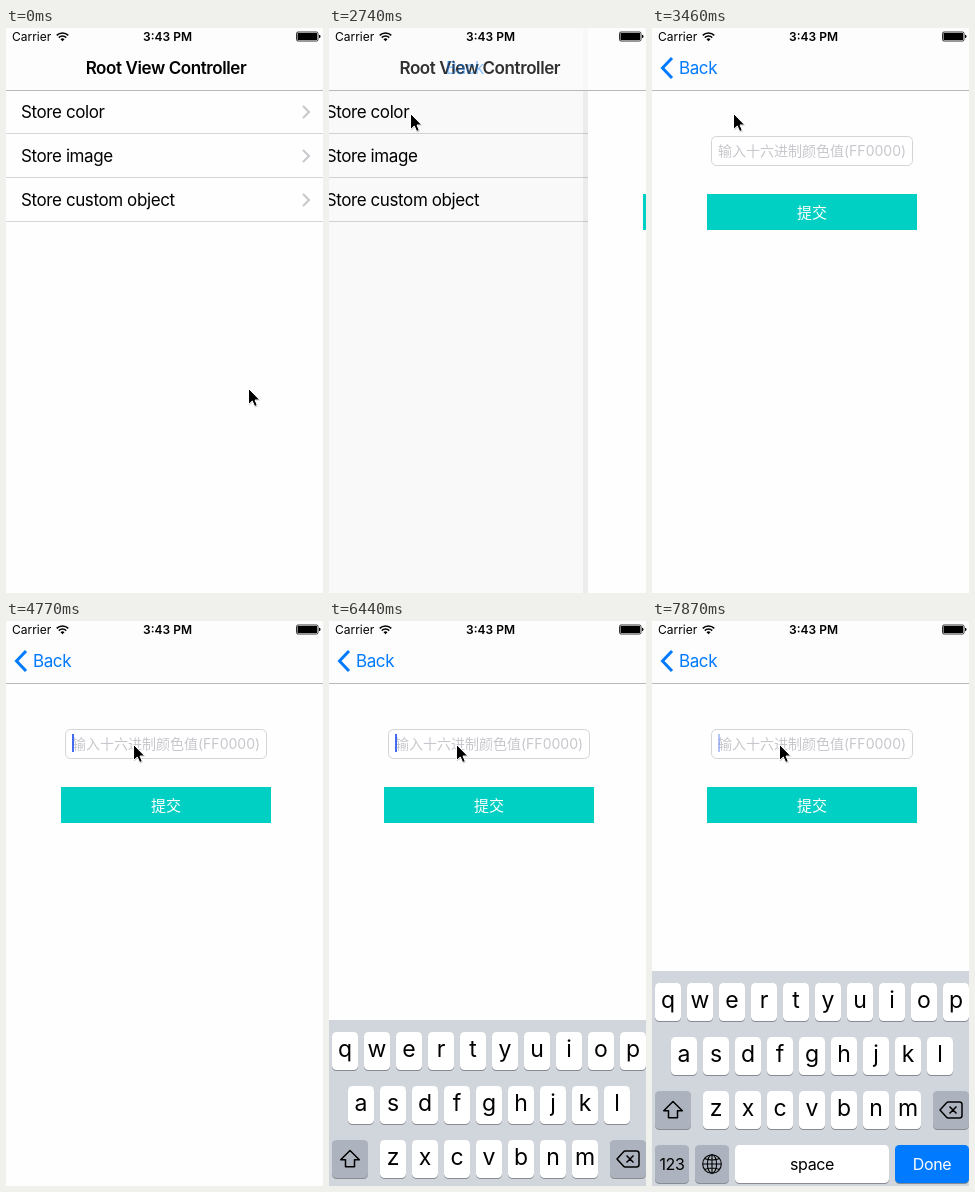
Recreate the animation shown at these times as an HTML page. Size 317 by 565 pixels, loop 7990 ms.

```html
<!DOCTYPE html>
<html lang="zh-CN">
<head>
<meta charset="utf-8">
<title>Navigation and keyboard</title>
<style>
  html, body { margin: 0; width: 100%; height: 100%; overflow: hidden; background: #fefefe; }
  svg { display: block; width: 100%; height: 100%; }
  text { font: 17px Inter, "Noto Sans CJK SC", "Noto Sans CJK", sans-serif; letter-spacing: -.4px; }
  .mid { text-anchor: middle; }
  .bold { font-weight: 600; }
  .status { font-size: 12px; letter-spacing: 0; }
  .letter { font-size: 23px; letter-spacing: 0; }
  .label { font-size: 16px; }
  .line { fill: none; stroke: #000; stroke-width: 1.5; }
</style>
</head>
<body>
<svg viewBox="0 0 317 565">
  <rect width="317" height="565" fill="#fefefe"/>
  <g id="list"></g>
  <rect id="dim" width="317" height="565"/>

  <g id="page">
    <rect x="-5" width="5" height="565" opacity=".05"/>
    <rect width="330" height="565" fill="#fefefe"/>
    <rect x="59.5" y="108.5" width="201" height="29" rx="5" fill="#fff" stroke="#d4d4d4"/>
    <text x="66" y="128" fill="#c7c7cd" style="font-size:14px;letter-spacing:0">输入十六进制颜色值(FF0000)</text>
    <rect id="caret" x="66" y="113" width="2" height="18" fill="#426bf2"/>
    <rect x="55" y="166" width="210" height="36" fill="#00cfc3"/>
    <text class="mid" x="160" y="190" fill="#fff" style="font-size:15px;letter-spacing:0">提交</text>
  </g>

  <rect width="317" height="62" fill="#fdfdfd" opacity=".75"/>
  <rect y="62" width="317" height="1" fill="#b9b9b9"/>
  <text id="title" class="mid bold" x="160" y="46">Root View Controller</text>
  <path id="chevron" d="M20 30 10.5 40 20 50" fill="none" stroke="#007aff" stroke-width="3"/>
  <text id="back" x="27" y="46" fill="#007aff">Back</text>

  <text class="status" x="6" y="13">Carrier</text>
  <path d="M50.7 7.4a8.3 8.3 0 0 1 11.6 0M52.8 9.6a5.3 5.3 0 0 1 7.4 0" class="line"/>
  <path d="M56.5 13.2l-2-2a2.8 2.8 0 0 1 4 0z"/>
  <text class="status bold mid" x="161.5" y="13">3:43 PM</text>
  <rect x="290.5" y="4" width="21.5" height="9" rx="1.5" fill="none" stroke="#000" stroke-width=".8"/>
  <path d="M291.5 5h19.5v7h-19.5zM313 6.8q1.6.3 1.6 1.7t-1.6 1.7z"/>

  <g id="keyboard"></g>
  <g id="pointer">
    <path d="M1 2V17.5L4.7 14.2 7 19.5 9.8 18.4 7.6 13H12.5Z" opacity=".22"/>
    <path d="M.5 .5V16.5L4.3 13 6.7 18.5 9.3 17.4 7 12H11.8Z" stroke="#fff"/>
  </g>
</svg>
<script>
const LOOP = 7990, TICK = 119.25, WIDTH = 320;
const $ = id => document.getElementById(id);
const move = (id, x, y = 0) => $(id).setAttribute('transform', `translate(${x} ${y})`);
const fade = (id, opacity) => $(id).setAttribute('opacity', opacity);

$('list').innerHTML = ['Store color', 'Store image', 'Store custom object'].map((name, i) => {
  const y = 62 + 44 * i;
  return `<text x="15" y="${y + 28}">${name}</text>
    <path d="M297 ${y + 16}l6 6-6 6" fill="none" stroke="#c7c7cc" stroke-width="2"/>
    <rect y="${y + 43}" width="330" height="1" fill="#d5d5d8"/>`;
}).join('');

// Key positions are relative to the top of the keyboard.
const rowTop = row => 12 + 54 * row;
const key = (row, x, width, fill, label = '', style = 'label', color = '#000') => {
  const y = rowTop(row);
  return `<rect x="${x}" y="${y + 1}" width="${width}" height="38" rx="4.5" fill="#888b91"/>
    <rect x="${x}" y="${y}" width="${width}" height="38" rx="4.5" fill="${fill}"/>
    <text class="mid ${style}" x="${x + width / 2}" y="${y + 25}" fill="${color}">${label}</text>`;
};
const letters = (row, x, chars) =>
  [...chars].map((c, i) => key(row, x + 32 * i, 26, '#fff', c, 'letter')).join('');
const GREY = '#adb3be';

$('keyboard').innerHTML = '<rect width="317" height="230" fill="#d1d5dc"/>' +
  letters(0, 3, 'qwertyuiop') + letters(1, 19, 'asdfghjkl') + letters(2, 51, 'zxcvbnm') +
  key(2, 3, 36, GREY) + key(2, 281, 36, GREY) +
  key(3, 3, 34, GREY, '123') + key(3, 43, 34, GREY) +
  key(3, 83, 154, '#fff', 'space') + key(3, 243, 74, '#007aff', 'Done', 'label', '#fff') +
  `<g class="line" stroke-linejoin="round">
    <path d="M21 130.5l9.3 9.3h-4.8v7h-9v-7h-4.8z"/>
    <path d="M288 139l6.6-7.3q.6-.7 1.6-.7h11.3q2.5 0 2.5 2.5v11q0 2.5-2.5 2.5h-11.3q-1 0-1.6-.7zM297.5 135.5l7 7m0-7l-7 7"/>
    <g stroke-width="1.1"><circle cx="60" cy="193" r="9.3"/><ellipse cx="60" cy="193" rx="4.6" ry="9.3"/>
    <path d="M60 183.7v18.6M50.7 193h18.6M52.5 187.5q7.5 3 15 0M52.5 198.5q7.5-3 15 0"/></g>
  </g>`;

// Remaining share of a critically damped spring.
const spring = x => (1 + x) * Math.exp(-x);

const stops = [[3, 242, 360], [10, 104, 148], [15, 81, 85], [29, 81, 85], [33, 127, 123]];
function pointerAt(tick) {
  if (tick <= 3) return stops[0].slice(1);
  const i = stops.findIndex(s => s[0] >= tick);
  if (i < 0) return stops.at(-1).slice(1);
  const [a, b] = [stops[i - 1], stops[i]];
  const u = (tick - a[0]) / (b[0] - a[0]);
  const e = i === 1 ? u : u * (2 - u);
  return [a[1] + (b[1] - a[1]) * e, a[2] + (b[2] - a[2]) * e];
}

// Each pair is a tick and the caret opacity from then on.
const blink = [[0, 0], [40, 1], [45, .45], [46, 0], [49, .45], [50, 1], [55, .45], [56, 0], [61, .45], [62, 1], [66, .4]];
const caretAt = tick => blink.filter(b => b[0] <= tick).at(-1)[1];

function draw(time) {
  const tick = Math.floor((time % LOOP + 6) / TICK);

  const rest = tick < 23 ? 1 : tick >= 29 ? 0 : spring(.8 * (tick - 22));
  const pushed = 1 - rest;
  move('list', -.3 * WIDTH * pushed);
  move('page', Math.round(WIDTH * rest) + (rest === 1 ? 10 : 0));
  fade('dim', .11 * pushed);
  move('title', -48 * pushed);
  fade('title', rest);
  move('back', 111 * rest);
  fade('back', Math.sqrt(pushed));
  fade('chevron', pushed ** 4);

  const hidden = tick < 54 ? 1.1 : tick >= 59 ? 0 : spring(2.83 + .8 * (tick - 54));
  move('keyboard', 0, 350 + Math.round(216 * hidden));
  fade('caret', caretAt(tick));
  move('pointer', ...pointerAt(tick));
}

function loop() {
  draw(performance.now());
  requestAnimationFrame(loop);
}
loop();
</script>
</body>
</html>
```
